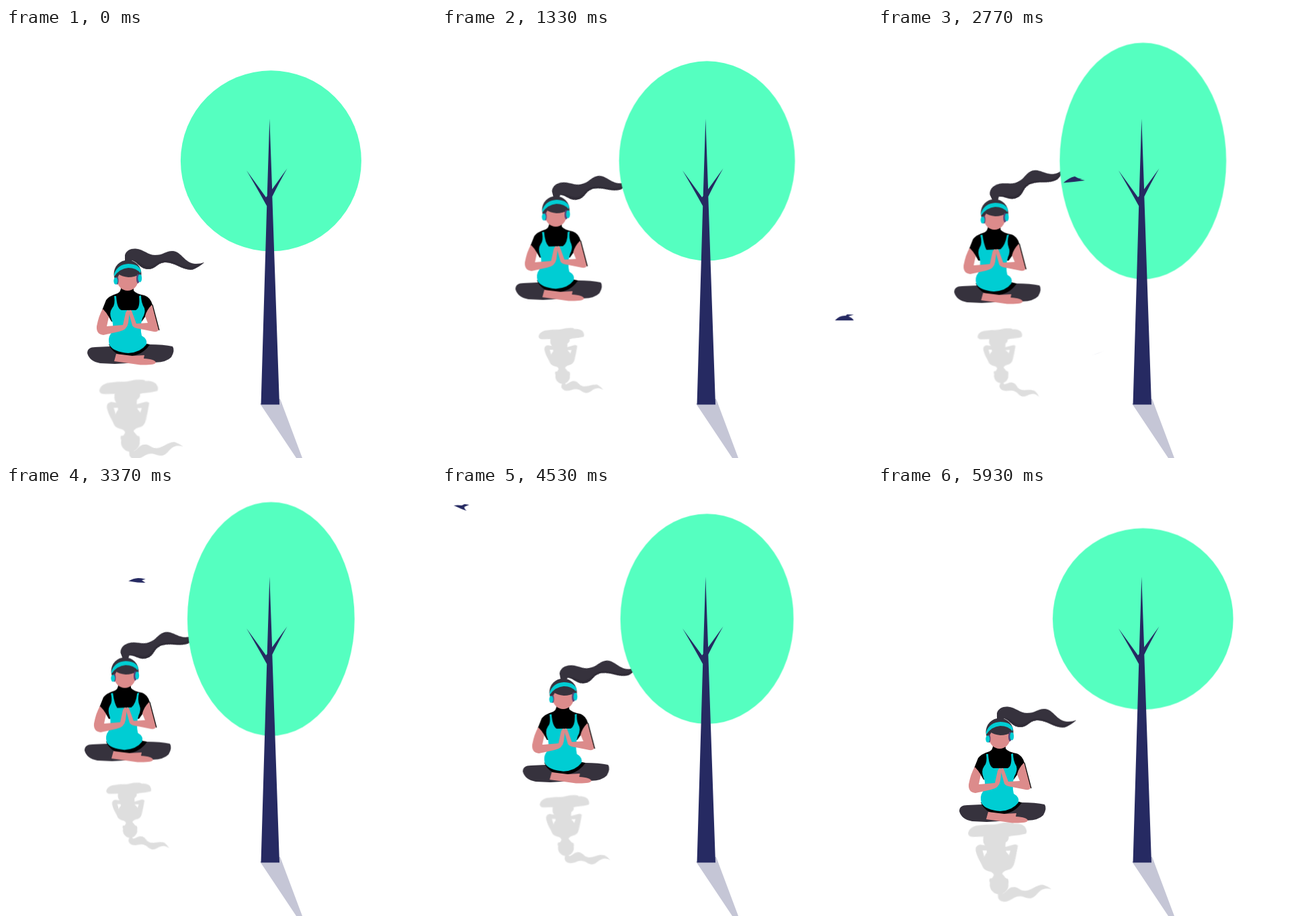
Write an HTML page that moves like this. It is 640x640 px and loops after 5960 ms.

```html
<!DOCTYPE html>
<html lang="en">
<head>
<meta charset="utf-8">
<title>Meditation under a tree</title>
<style>
  html, body { margin: 0; width: 100%; height: 100%; overflow: hidden; background: #fff; }
  svg { display: block; width: 100vw; height: 100vh; }

  .float, .tail, .top, .crown, .cast, .fly, .bird, .fade {
    animation: 5960ms linear infinite;
  }
  .float { animation-name: float; }
  .tail { animation-name: sway; transform-origin: 178px 345px; }
  .top { animation-name: breathe; }
  .crown { animation-name: stretch; transform-origin: 394.4px 197.8px; }
  .cast { animation-name: cast; }
  .fly { animation-name: fly; }
  .bird { animation-name: flap; }
  .fade { animation-name: fade; }

  .navy { fill: #262a62; }
  .dark { fill: #36323d; }
  .skin { fill: #dc8b8b; }
  .teal { fill: #00cdd3; }

  @keyframes float {
    0% { transform: translate(0, 0); }
    12.92% { transform: translate(-7px, -61px); }
    20% { transform: translate(-11px, -91px); }
    27% { transform: translate(-13px, -104px); }
    33.05% { transform: translate(-11.6px, -102px); }
    46.48% { transform: translate(-7.6px, -90.8px); }
    50.84% { transform: translate(-6px, -92px); }
    65.94% { transform: translate(-1px, -88px); }
    85.07% { transform: translate(-.5px, -33px); }
    99.5%, 100% { transform: translate(0, 0); }
  }
  @keyframes sway {
    0%, 100% { transform: rotate(0deg); }
    12.92% { transform: rotate(-7.5deg); }
    33.05% { transform: rotate(-21deg); }
    46.48% { transform: rotate(-25deg); }
    65.94% { transform: rotate(-16deg); }
    85.07% { transform: rotate(-6.3deg); }
  }
  /* straps and sides draw in while the sitter is high */
  @keyframes breathe {
    0%, 13%, 85%, 100% { d: path("M161 399L164 399Q165 418 172 420L193 420Q200 417 198 399L201 398Q201 409 206 417Q208 424 203 432Q199 445 202 458Q211 463 209 471Q200 483 182 484Q160 482 154 472Q151 462 156 455Q162 444 157 434Q153 424 158 417Q163 412 161 399Z"); }
    33%, 50% { d: path("M160 399L163 398.5Q165 413 169 421L190 420Q197 414 199.5 399L202.5 398Q199 409 202 417Q205 424 201 432Q197 445 200 458Q209 463 206 471Q198 482 180 483Q159 481 154 472Q151 462 157 455Q161 444 159 434Q155 424 159 417Q163 412 160 399Z"); }
  }
  @keyframes stretch {
    0%, 10%, 100% { transform: scale(1, 1); }
    50% { transform: scale(.914, 1.338); }
  }
  /* mirrored shadow on the ground, shrinking as the sitter rises */
  @keyframes cast {
    0% { transform: translate(138px, 528px) rotate(-4deg) scale(1); }
    12.92% { transform: translate(139px, 472px) rotate(-4deg) scale(.845); }
    20% { transform: translate(142.5px, 451px) rotate(-4deg) scale(.78); }
    33.05% { transform: translate(145.5px, 445.5px) rotate(-4deg) scale(.755); }
    46.48% { transform: translate(147.5px, 450.5px) rotate(-4deg) scale(.76); }
    50.84% { transform: translate(148px, 446px) rotate(-4deg) scale(.757); }
    65.94% { transform: translate(149.5px, 443.5px) rotate(-4deg) scale(.778); }
    85.07% { transform: translate(140.5px, 482.5px) rotate(-4deg) scale(.9); }
    100% { transform: translate(133px, 506px) rotate(-4deg) scale(1); }
  }
  @keyframes fly {
    0%, 17.6% { transform: translate(660px, 482px); }
    20.13% { transform: translate(628px, 455px); }
    30.7% { transform: translate(488px, 341px); }
    33.05% { transform: translate(454.5px, 314px); }
    46.48% { transform: translate(292px, 226px); }
    65.94% { transform: translate(107px, 62px); }
    70.47% { transform: translate(71px, 43px); }
    80.5% { transform: translate(-4px, 23px); }
    84%, 100% { transform: translate(-35px, 20px); }
  }
  @keyframes flap {
    0%, 33.05% { d: path("M-14 4Q-7 -4 2 -3L4 -5L14 -4.5L6 -2Q12 0 14 4L0 4Z"); }
    46.48% { d: path("M-16 4.5Q-8 -3 1 -5L6 -2.5L12 -1L8 -.5Q13 -.5 16 1L0 3Z"); }
    65.94%, 100% { d: path("M-12 -3Q-6 -4 0 -3L4 -5L11 -4L4 -1Q3 1 7 5L-1 2Z"); }
  }
  @keyframes fade {
    0%, 33.05% { opacity: .23; transform: translate(41px, 258px); }
    46.48% { opacity: .08; transform: translate(36px, 258px) rotate(-20deg) scale(.55, .1); }
    47.5%, 100% { opacity: 0; transform: translate(36px, 258px) scale(.5, .1); }
  }
</style>
</head>
<body>
<svg viewBox="0 0 640 640">
  <defs>
    <filter id="grey" color-interpolation-filters="sRGB">
      <feFlood flood-color="#dedede"/>
      <feComposite in2="SourceAlpha" operator="in"/>
    </filter>
  </defs>

  <path d="M378 559L408 552L441 640H432Z" fill="#c5c6d6"/>

  <g class="cast">
    <g class="shade" transform="scale(.68 -.68) translate(-121 -501)" filter="url(#grey)"></g>
  </g>
  <g class="fly">
    <g class="fade"><path class="bird navy" d="M-14 4L14 4Z"/></g>
  </g>

  <g class="float">
    <g class="sitter">
      <g class="tail">
        <path class="dark" d="M177 347V338C179 331 186 328 193 328.5C206 330 211 338 222 338C235 338 238 331 249 332C262 334 265 349 281 351Q289 351.5 295 349Q287 356 278 359.5C262 361 252 349 238 349C225 349 224 358 213 359C200 359.5 197 349 188 346L184 351L172 352Z"/>
        <path d="M188 346C197 344 203 356 213 355C224 354 225 346 238 346C252 346 262 358 278 356L295 349Q287 356 278 359.5C262 361 252 349 238 349C225 349 224 358 213 359C200 359.5 197 349 188 346Z" fill="#2f2b36"/>
      </g>

      <!-- legs -->
      <path class="dark" d="M133 475Q121 475 121 484Q124 496 140 499L162 500L213 497Q236 500 246 490Q252 480 248 474Q235 471 213 471L182 478L155 474Z"/>
      <path d="M153 471Q160 488 182 488.5Q203 488 214 471L200 468H160Z"/>
      <path class="skin" d="M164 485L188 488L206 487L205 492Q222 493 223 498Q222 502 200 501.5L161 496Z"/>

      <!-- shirt and top -->
      <path d="M171 387H190V391Q194 396 206 398Q215 401 218 412L207 430L202 437H157L153 430L143 420L149 405Q153 399 166 395Q171 392 171 387Z"/>
      <path class="top teal" d="M161 399H201V472H154Z"/>

      <!-- arms -->
      <path class="skin" d="M144 418Q150 424 153 430L150 444L174 442L178 424Q181 417 184 422L182 439Q180 450 168 452L145 457Q134 456 135 444Q138 428 144 418Z"/>
      <path class="skin" d="M217 412Q209 420 207 429L211 439L194 440L187 421Q183 417 183 425L188 443Q190 447 200 448L220 452Q228 453 227 447Q223 428 217 412Z"/>
      <path d="M218 412L228 450" fill="none" stroke="#000" stroke-width="1.2"/>

      <!-- head -->
      <circle class="dark" cx="181" cy="366" r="20.5"/>
      <circle class="skin" cx="181" cy="375.8" r="15.3"/>
      <path class="dark" d="M164 368Q172 356 183 356Q195 356 200 366Q192 371 182 371Q172 370 167 366Z"/>
      <path class="teal" d="M161 366Q166 352 182 351Q197 351 201 361L200 365Q194 357 182 357Q169 358 161 370Z"/>
      <ellipse cx="196.5" cy="373" rx="2.5" ry="7" fill="#55457a"/>
      <ellipse class="teal" cx="199.3" cy="372.5" rx="2.9" ry="6"/>
      <ellipse cx="165.5" cy="376" rx="2" ry="6" fill="#55457a"/>
      <ellipse class="teal" cx="163.3" cy="376.5" rx="3" ry="5.2"/>
    </g>
  </g>

  <circle class="crown" cx="394.4" cy="197.8" r="134.5" fill="#55ffc0"/>
  <path class="navy" d="M392.3 135L396.1 240L418.5 209Q406 231 396.3 251L407 560.5H379.5L388.2 265Q374.5 240 358 212L387 252L388.7 250Z"/>

  <g class="fly"><path class="bird navy" d="M-14 4L14 4Z"/></g>
</svg>
<script>
  // The shadow is a live copy, so its hair sways along.
  const sitter = document.querySelector('.sitter');
  document.querySelector('.shade').append(sitter.cloneNode(true));
</script>
</body>
</html>
```
